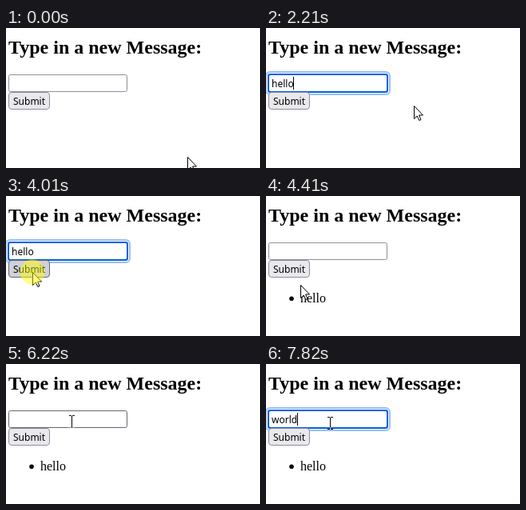
Recreate the animation shown at these times as an HTML page. Size 318 by 175 pixels, loop 8000 ms.

```html
<!DOCTYPE html>
<html lang="en">
<head>
<meta charset="utf-8">
<title>Message form</title>
<style>
  html, body { margin: 0; width: 100%; height: 100%; overflow: hidden; background: #fff; }
  svg { display: block; width: 318px; height: 175px; }
  .serif { font: 16px "Liberation Serif", serif; }
  .title { font: bold 24px "Liberation Serif", serif; }
  .ui { font: 12px "Noto Sans", sans-serif; white-space: pre; }
  #beam { mix-blend-mode: difference; }
</style>
</head>
<body>
<svg viewBox="0 0 318 175">
  <rect width="318" height="175" fill="#fff"/>
  <text class="title" x="3" y="32">Type in a new Message:</text>

  <rect id="field" x="3.5" y="58.5" width="148" height="21" rx="2" fill="#fff"/>
  <g id="ring" fill="none">
    <rect x="0" y="55" width="155" height="28" rx="5" stroke="#0061e0" stroke-opacity=".4" stroke-width="2"/>
    <rect x="1.5" y="56.5" width="152" height="25" rx="3.5" stroke="#fff"/>
    <rect x="3" y="58" width="149" height="22" rx="2" stroke="#0061e0" stroke-width="2"/>
  </g>
  <text id="value" class="ui" x="7" y="74"></text>
  <rect id="caret" y="61" width="1" height="16"/>

  <rect id="button" x="3.5" y="80.5" width="51" height="21" rx="3.5"/>
  <text class="ui" x="9" y="96">Submit</text>

  <g id="list">
    <circle cx="32" cy="128.3" r="2.8"/>
    <text class="serif" x="43" y="133">hello</text>
  </g>

  <path id="arrow" d="M.5 .5V16.5L4.2 13L6.8 18.5L9 17.6L6.6 12H11.5Z" fill="#fff" stroke="#000"/>
  <path id="beam" d="M-3 -6.5H0M1 -6.5H4M-3 8.5H0M1 8.5H4M.5 -6V8" fill="none" stroke="#fff"/>
  <circle id="press" r="15.5" fill="#ff0" fill-opacity=".47"/>
</svg>
<script>
const LOOP = 8000;
const start = { x: 227, y: 161, shape: 'arrow', focus: false, text: '', caret: false,
                press: false, hover: false, list: false };

// Each step changes only the listed properties, from its time on.
const steps = [
  [0, {}],
  [200, { x: 165, y: 128 }],
  [400, { x: 62, y: 75, shape: 'beam' }],
  [590, { x: 53, y: 78, focus: true, caret: true }],
  [800, { x: 185, y: 97, shape: 'arrow' }],
  [1210, { caret: false }],
  [1610, { text: 'h', caret: true }],
  [1810, { text: 'hel' }],
  [2010, { text: 'hell' }],
  [2210, { text: 'hello' }],
  [2810, { caret: false }],
  [3410, { x: 142, y: 98, caret: true }],
  [3610, { x: 62, y: 97 }],
  [3810, { x: 34, y: 95, hover: true }],
  [4010, { x: 33, caret: false, press: true }],
  [4210, { press: false, focus: false, text: '', list: true }],
  [4410, { x: 43, y: 111, hover: false }],
  [5820, { x: 65, y: 84 }],
  [6020, { x: 84, y: 46 }],
  [6220, { x: 82, y: 71, shape: 'beam' }],
  [6420, { x: 80, y: 73, focus: true, caret: true, press: true }],
  [6620, { press: false }],
  [7020, { text: 'w', caret: false }],
  [7420, { text: 'wor', caret: true }],
  [7620, { text: 'worl' }],
  [7820, { text: 'world' }]
];

const el = id => document.getElementById(id);
const show = (id, on) => el(id).setAttribute('visibility', on ? 'visible' : 'hidden');
const border = (id, hover) => el(id).setAttribute('stroke', hover ? '#676774' : '#8f8f9d');

function draw(time) {
  const s = Object.assign({}, start, ...steps.filter(([at]) => at <= time).map(step => step[1]));
  for (const id of ['arrow', 'beam', 'press']) {
    el(id).setAttribute('transform', `translate(${s.x} ${s.y})`);
  }
  show('arrow', s.shape === 'arrow');
  show('beam', s.shape === 'beam');
  show('press', s.press);
  show('ring', s.focus);
  show('list', s.list);
  show('caret', s.caret);
  border('field', s.shape === 'beam');
  border('button', s.hover);
  el('button').setAttribute('fill', s.hover ? '#d0d0d7' : '#e9e9ed');
  el('value').textContent = s.text;
  el('caret').setAttribute('x', 7 + (s.text ? Math.floor(el('value').getComputedTextLength()) : 0));
}

const begin = performance.now();
function frame() {
  draw((performance.now() - begin) % LOOP);
  requestAnimationFrame(frame);
}
frame();
</script>
</body>
</html>
```
